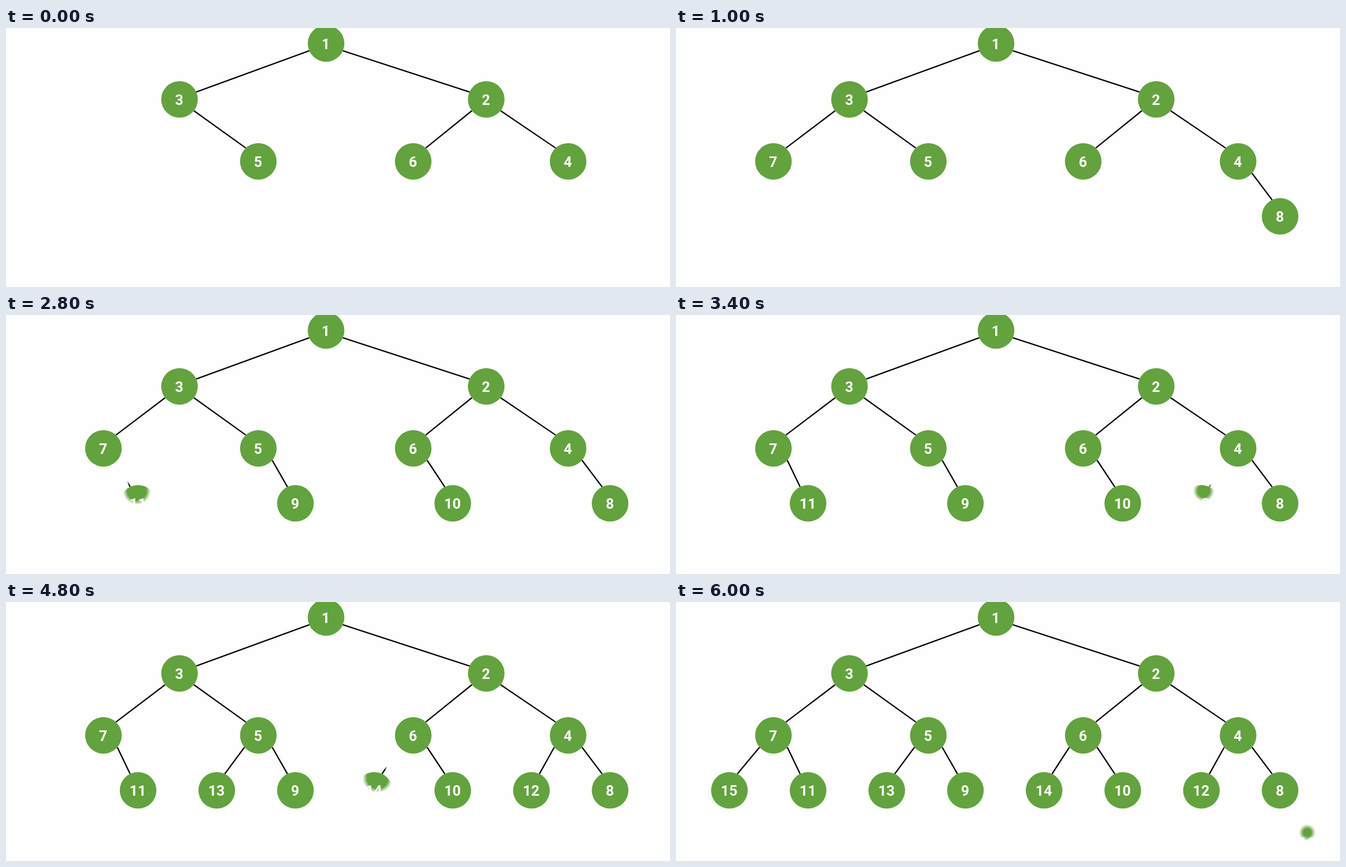
These frames come from a looping animation (1196 by 468 pixels, 6200 ms). An HTML page with a canvas:

```html
<!DOCTYPE html>
<html lang="en">
<head>
<meta charset="utf-8">
<title>Binary tree, level by level</title>
<style>
  html, body { margin: 0; height: 100%; overflow: hidden; background: #fefefe; }
  canvas { display: block; }
</style>
</head>
<body>
<canvas id="stage" width="1196" height="468"></canvas>
<script>
const LOOP = 6200, TICK = 200, RADIUS = 33, COUNT = 16;
const ctx = document.getElementById("stage").getContext("2d");

// One row per level; edges leave the parent and reach the child at fixed angles
const levels = [
  { y: 28, left: 576.5, gap: 0 },
  { y: 129, left: 312.5, gap: 552.5, leave: 0.41, reach: 0.42 },
  { y: 241, left: 175.5, gap: 279, leave: 0.67, reach: 0.82 },
  { y: 340.3, left: 96.2, gap: 141.7, leave: 0.71, reach: 1.12 },
  { y: 434, left: 72, gap: 71, leave: 0.9, reach: 1.1 }
];

const nodes = [];
for (let label = 1; label <= COUNT; label++) nodes[label] = makeNode(label);

// Each level gets all its right children first, then all its left ones
function makeNode(label) {
  const depth = Math.floor(Math.log2(label));
  const { y, left, gap, leave, reach } = levels[depth];
  const half = 2 ** depth / 2;
  const index = label - 2 ** depth;
  const isRight = index < half;
  const parent = depth && nodes[half + index % half];
  const slot = depth && 2 * parent.slot + isRight;
  const x = left + slot * gap;
  const side = isRight ? RADIUS : -RADIUS;
  const edge = parent && {
    x1: parent.x + side * Math.cos(leave),
    y1: parent.y + RADIUS * Math.sin(leave),
    x2: x - side * Math.cos(reach),
    y2: y - RADIUS * Math.sin(reach)
  };
  // The later a node starts within its tick, the less its iris has opened
  const start = 1.25 + 3.3 * (label - 7);
  const tick = Math.floor(start);
  return { label, slot, x, y, edge, tick, iris: 32 - 20 * (start - tick) };
}

function drawNode({ label, x, y, edge }) {
  ctx.fillStyle = "#62a33d";
  ctx.beginPath();
  ctx.arc(x, y, RADIUS, 0, 2 * Math.PI);
  ctx.fill();
  if (edge) {
    ctx.beginPath();
    ctx.moveTo(edge.x1, edge.y1);
    ctx.lineTo(edge.x2, edge.y2);
    ctx.stroke();
  }
  ctx.fillStyle = "#fff";
  ctx.fillText(label, x - 0.5, y + 9.5);
}

// Hides everything outside a soft circle centred on the node and its edge
function drawIris({ x, y, edge, iris }) {
  const middle = (...values) => (Math.min(...values) + Math.max(...values)) / 2;
  const cx = middle(x - RADIUS, x + RADIUS, edge.x1);
  const cy = middle(y + RADIUS, edge.y1);
  const shade = ctx.createRadialGradient(cx, cy, iris - 6, cx, cy, iris + 2);
  shade.addColorStop(0, "rgba(254, 254, 254, 0)");
  shade.addColorStop(1, "#fefefe");
  ctx.fillStyle = shade;
  ctx.fillRect(0, 0, 1196, 468);
}

function draw() {
  const now = Math.floor(performance.now() % LOOP / TICK);
  ctx.fillStyle = "#fefefe";
  ctx.fillRect(0, 0, 1196, 468);
  ctx.strokeStyle = "#000";
  ctx.lineWidth = 2.4;
  ctx.textAlign = "center";
  ctx.font = "bold 26px Roboto, sans-serif";

  // The opening node goes first, so its iris covers none of the others
  const opening = nodes.find(node => node && node.tick === now);
  if (opening) {
    drawNode(opening);
    drawIris(opening);
  }
  nodes.filter(node => node.tick < now).forEach(drawNode);
  requestAnimationFrame(draw);
}
draw();
</script>
</body>
</html>
```
